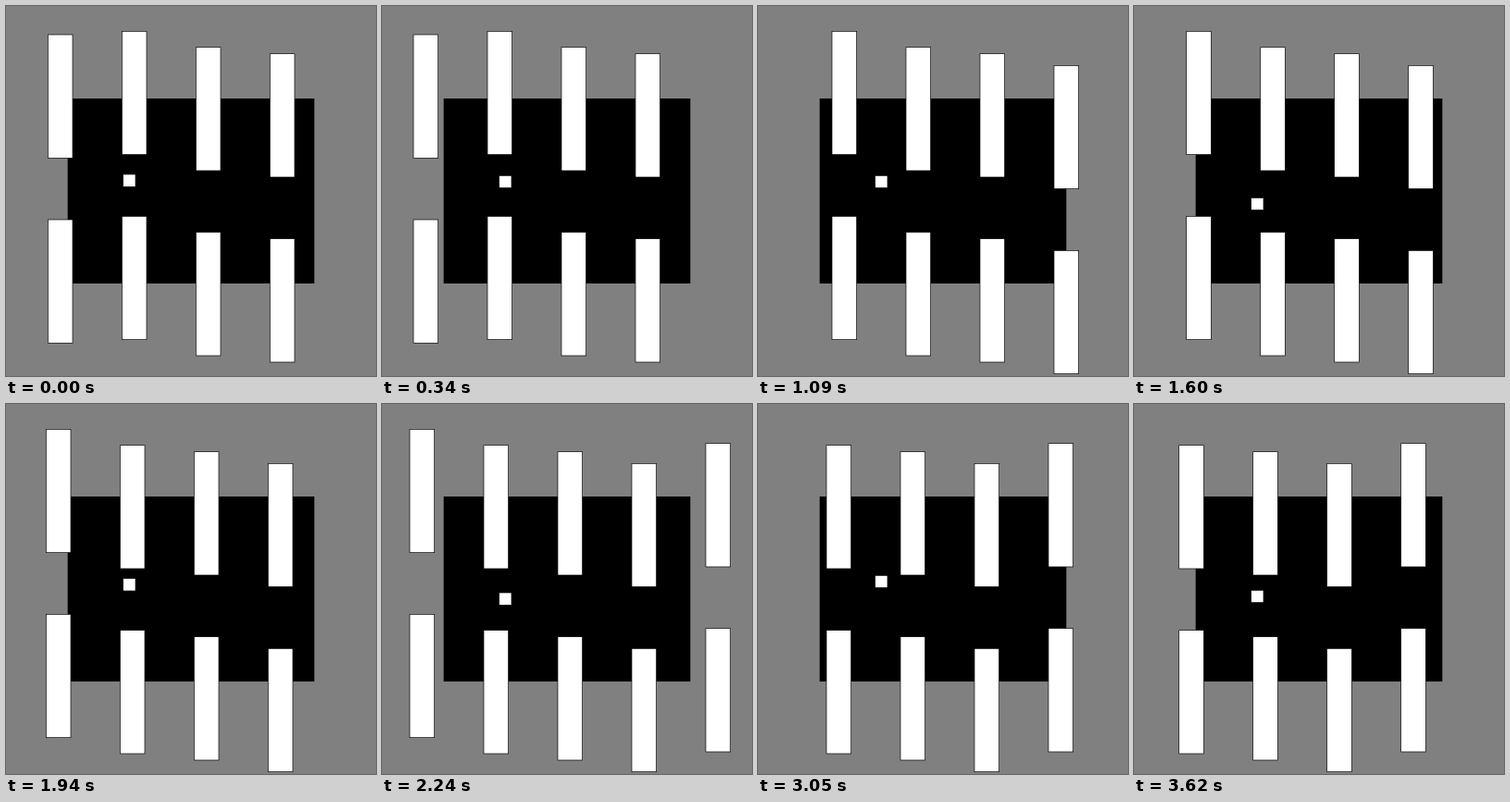
Write an HTML page with a canvas that moves like this. It is 400x400 px and loops after 3650 ms.

```html
<!DOCTYPE html>
<html lang="en">
<head>
<meta charset="utf-8">
<title>Flappy square</title>
<style>
  html, body { margin: 0; width: 100%; height: 100%; overflow: hidden; background: #808080; }
  canvas { display: block; width: 400px; height: 400px; }
</style>
</head>
<body>
<canvas id="stage" width="400" height="400"></canvas>
<script>
const ctx = document.getElementById('stage').getContext('2d');
const LOOP = 3650;
const SCALE = 2 / 3; // game units are 600 x 600

const PIPE = { width: 40, height: 200, gap: 100, first: 68, spacing: 120 };
const TOPS = [46.5, 41, 67, 77.5, 96.5, 64];

const BIRD = { x: 190, size: 20, lift: 4, gravity: 0.2 };
// [tick, height] of every flap
const FLAPS = [
  [-22, 312.6], [12, 292.5], [56, 308.6], [100, 322.1],
  [139, 320.4], [178, 317.9], [222, 337.1]
];

// Drawn steps last 30 ms, apart from two longer holds.
function stepAt(t) {
  if (t < 100) return 0;
  if (t < 1670) return Math.min(51, 1 + Math.floor((t - 100) / 30));
  return 52 + Math.floor((t - 1670) / 30);
}

// Two game ticks per step, with a few uneven ones.
function tickAt(step) {
  return step === 0 ? 0 : 2 * step - 1 + (step >= 27) + (step >= 43);
}

function birdY(tick) {
  const [start, y] = FLAPS.filter(f => f[0] <= tick).pop();
  const s = tick - start;
  return y - BIRD.lift * s + BIRD.gravity * s * s / 2;
}

function box(x, y, w, h) {
  ctx.fillRect(x, y, w, h);
  ctx.strokeRect(x, y, w, h);
}

function draw(t) {
  const tick = tickAt(stepAt(t));
  ctx.setTransform(SCALE, 0, 0, SCALE, 0, 0);
  ctx.fillStyle = '#808080';
  ctx.fillRect(0, 0, 600, 600);
  ctx.fillStyle = '#000';
  ctx.fillRect(100, 150, 400, 300);

  ctx.fillStyle = '#fff';
  ctx.strokeStyle = '#000';
  ctx.lineWidth = 1;
  TOPS.forEach((top, i) => {
    const x = PIPE.first + PIPE.spacing * i - tick;
    if (x <= 30 || x >= 529) return;
    box(x, top, PIPE.width, PIPE.height);
    box(x, top + PIPE.height + PIPE.gap, PIPE.width, PIPE.height);
  });
  box(BIRD.x, birdY(tick), BIRD.size, BIRD.size);
}

const start = performance.now();
function loop() {
  draw((performance.now() - start) % LOOP);
  requestAnimationFrame(loop);
}
loop();
</script>
</body>
</html>
```
